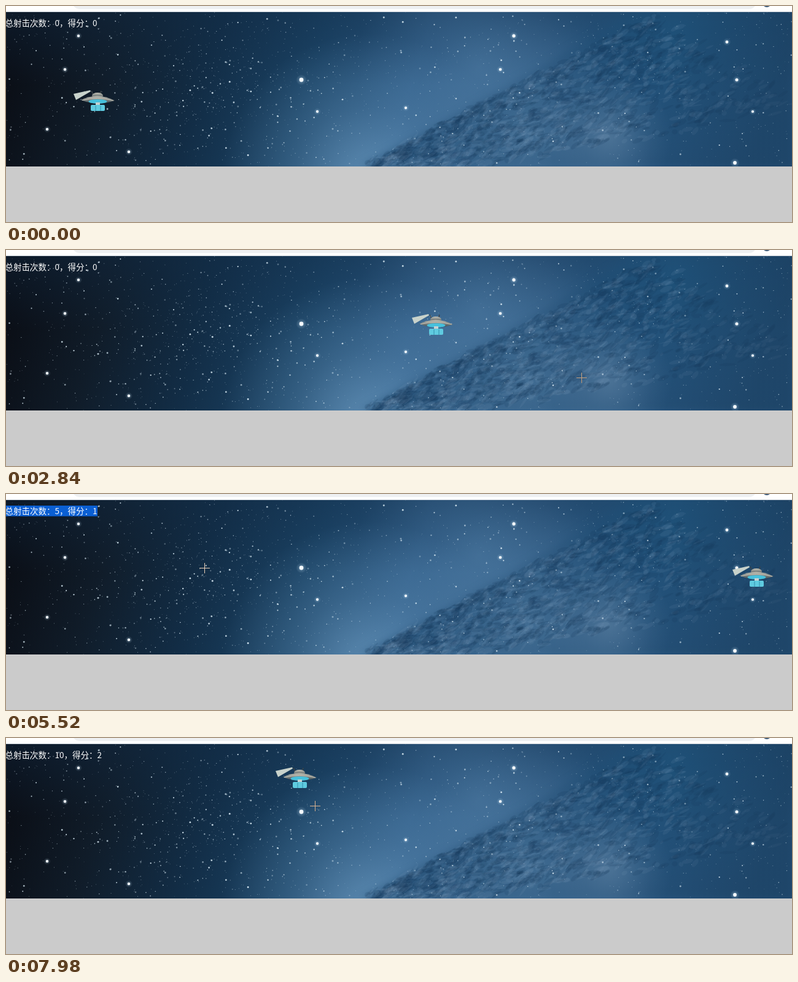
Animation of 1280x354 px, one loop 8 s. Source, as an HTML page with a canvas:

```html
<!DOCTYPE html>
<html lang="zh-CN">
<head>
<meta charset="utf-8">
<title>UFO</title>
<style>
html, body { margin: 0; width: 100%; height: 100%; overflow: hidden; background: #cbcbcb; }
canvas, svg { position: absolute; left: 0; top: 0; display: block; }
#cursor { left: -8px; top: -8px; mix-blend-mode: difference; }
text { font: 13.5px "Noto Sans CJK SC", "Noto Sans CJK", sans-serif; fill: #fff; }
</style>
</head>
<body>
<canvas id="sky" width="1280" height="354"></canvas>
<svg width="1280" height="354">
  <defs>
    <linearGradient id="hull" x1="0" y1="0" x2="0" y2="1">
      <stop offset="0" stop-color="#c4c2b6"/>
      <stop offset="1" stop-color="#35434b"/>
    </linearGradient>
  </defs>
  <rect id="mark" y="19" width="149" height="17.5" fill="#0a5fd3"/>
  <text id="score" x="-1.4" y="33"></text>
  <g id="ufo">
    <path d="M0 8L27 2L28 4L4 18Z" fill="#c8d2cb"/>
    <path d="M29 3L32 9M43 10L45 3" stroke="#3c4549" stroke-width="1.5"/>
    <ellipse cx="39" cy="11" rx="9" ry="5" fill="url(#hull)"/>
    <path d="M12 18Q39.5 5 67 19Q39.5 29 12 18Z" fill="url(#hull)"/>
    <path d="M14 18.6Q39 12 65 19" stroke="#c9c6ba" fill="none"/>
    <ellipse cx="39.5" cy="20.5" rx="15" ry="3.5" fill="#46c0dc"/>
    <rect x="36" y="22" width="7" height="5" fill="#c4d2d3"/>
    <rect x="28" y="26" width="23" height="10" rx="2" fill="#5fcbe0"/>
    <path d="M36 27V36M44 27V36" stroke="#348fac"/>
  </g>
  <circle id="press" r="10" fill="#c3c51f" fill-opacity=".85"/>
</svg>
<svg id="cursor" width="17" height="17">
  <path d="M0 8.5H17M8.5 0V17" stroke="#fff"/>
</svg>
<script>
const $ = id => document.getElementById(id);
const LOOP = 8000, STEP = 76.87;

function random(seed) {
  return () => (seed = (seed * 16807) % 2147483647) / 2147483647;
}

function paintSky() {
  const c = $('sky').getContext('2d');
  const rnd = random(4711);
  const fill = (style, x = 0, y = 10, w = 1280, h = 253) => {
    c.fillStyle = style;
    c.fillRect(x, y, w, h);
  };
  const fade = (g, ...colors) => {
    colors.forEach((color, i) => g.addColorStop(i / (colors.length - 1), color));
    fill(g);
  };
  const glow = (x, y, r, rgb, a) => fade(c.createRadialGradient(x, y, 0, x, y, r),
    `rgba(${rgb},${a})`, `rgba(${rgb},${a * .4})`, `rgba(${rgb},0)`);
  const dot = (x, y, r, style) => {
    c.fillStyle = style;
    c.beginPath();
    c.arc(x, y, r, 0, 7);
    c.fill();
  };

  fill('#cbcbcb', 0, 0, 1280, 354);
  c.save();
  c.beginPath();
  c.rect(0, 10, 1280, 253);
  c.clip();
  fade(c.createLinearGradient(0, 70, 620, 260), '#0a0d14', '#101c29', '#122d46', '#1b4365', '#2d5a84');
  fade(c.createLinearGradient(0, 10, 0, 130), 'rgba(18,46,74,.4)', 'rgba(18,46,74,0)');
  glow(590, 285, 240, '120,168,206', .65);
  glow(770, 100, 200, '92,138,178', .4);

  // dust lane with its lit inner side
  c.save();
  c.filter = 'blur(7px)';
  c.fillStyle = 'rgba(32,76,114,.6)';
  c.beginPath();
  c.moveTo(575, 264);
  c.quadraticCurveTo(780, 160, 1020, 10);
  c.lineTo(1280, 10);
  c.lineTo(1280, 264);
  c.fill();
  c.restore();
  glow(1090, 50, 210, '28,84,124', .55);
  glow(850, 215, 200, '98,140,176', .45);
  glow(985, 215, 100, '120,152,182', .4);
  for (let i = 0; i < 1800; i++) {
    const u = rnd(), v = rnd() ** 1.5;
    const x = 585 + 470 * u + v * (60 + 190 * u);
    const y = 263 - 245 * u + v * (25 + 120 * u) + (rnd() - .5) * 18;
    c.fillStyle = rnd() < .72 - .3 * v ? 'rgba(20,54,86,.15)' : 'rgba(134,166,194,.1)';
    c.beginPath();
    c.ellipse(x, y, 3 + rnd() * 11, 1 + rnd() * 3.5, -.5 + (rnd() - .5), 0, 7);
    c.fill();
  }
  fade(c.createLinearGradient(1100, 0, 1280, 60), 'rgba(22,56,86,0)', 'rgba(22,56,86,.45)');

  for (let i = 0; i < 1700; i++) {
    const near = i % 3 == 0;
    const x = near ? 330 + (rnd() + rnd() - 1) * 270 : rnd() * 1280;
    const y = near ? 140 + (rnd() + rnd() - 1) * 130 : 10 + rnd() * 253;
    dot(x, y, .4 + rnd() ** 5 * 1.1, `rgba(215,232,242,${.3 + rnd() * .65})`);
  }
  const bright = [[481, 121], [1187, 257], [827, 49], [1190, 121], [1174, 59], [805, 104],
    [200, 239], [96, 104], [118, 49], [67, 202], [507, 173], [651, 167], [1216, 173]];
  bright.forEach(([x, y], i) => {
    const r = 1.9 + 1.5 / (1 + i * .5);
    glow(x, y, r * 2.6, '200,228,245', .5);
    dot(x, y, r, '#f4faff');
  });
  c.restore();

  // bottom edge of the browser bar
  fill('#fff', 0, 0, 1280, 9);
  fill('#c9d0d8', 0, 9, 1280, 1);
  c.fillStyle = '#eef0f2';
  c.beginPath();
  c.roundRect(108, -20, 1114, 25, 12);
  c.fill();
  dot(1239, -5, 7, '#3d5a78');
}

// cursor stops: time, x, y
const path = [
  [460, 878, 321], [1300, 764, 260], [2580, 764, 260], [2840, 937, 209], [3100, 1191, 343],
  [3400, 904, 177], [5170, 904, 177], [5500, 323, 121], [6000, 371, 125], [6450, 290, 139],
  [7100, 404, 152], [7740, 404, 152], [7980, 503, 111]
];
// clicks come in quick, even bursts
const burst = (start, n) => Array.from({ length: n }, (_, i) => start + 290 * i);
const shots = [...burst(3990, 5), ...burst(6030, 2), ...burst(7130, 3)];
const hits = [shots[0], shots[9]];
const count = (times, t) => times.filter(s => t >= s).length;

function cursorAt(t) {
  const i = path.findIndex(p => p[0] >= t);
  if (i < 1) return path.at(i).slice(1);
  const [t0, x0, y0] = path[i - 1], [t1, x1, y1] = path[i];
  const f = (t - t0) / (t1 - t0), e = f * f * (3 - 2 * f);
  return [x0 + (x1 - x0) * e, y0 + (y1 - y0) * e];
}

const show = (el, on) => { el.style.visibility = on ? 'visible' : 'hidden'; };

function draw(ms) {
  const k = Math.max(0, Math.floor((ms - 70) / STEP + .15) + 1);
  const t = k * STEP - 7;

  const x = (110 + 14.9 * k) % 1220.5;
  const y = 103 + 67 * Math.sin((x + .9) * .02372);
  $('ufo').setAttribute('transform', `translate(${Math.round(x)} ${Math.round(y)})`);

  const label = `总射击次数：${count(shots, t)}，得分：${count(hits, t)}`;
  if ($('score').textContent != label) $('score').textContent = label;
  show($('mark'), t >= shots[1] && t < shots[5]);

  const [cx, cy] = cursorAt(t).map(Math.round);
  const pressed = shots.some(s => t >= s - 130 && t < s);
  $('press').setAttribute('transform', `translate(${cx} ${cy})`);
  $('cursor').style.transform = `translate(${cx}px, ${cy}px)`;
  show($('press'), pressed);
  show($('cursor'), t >= path[0][0] && !pressed);
}

paintSky();
const start = performance.now();
function tick() {
  draw((performance.now() - start) % LOOP);
  requestAnimationFrame(tick);
}
tick();
</script>
</body>
</html>
```
